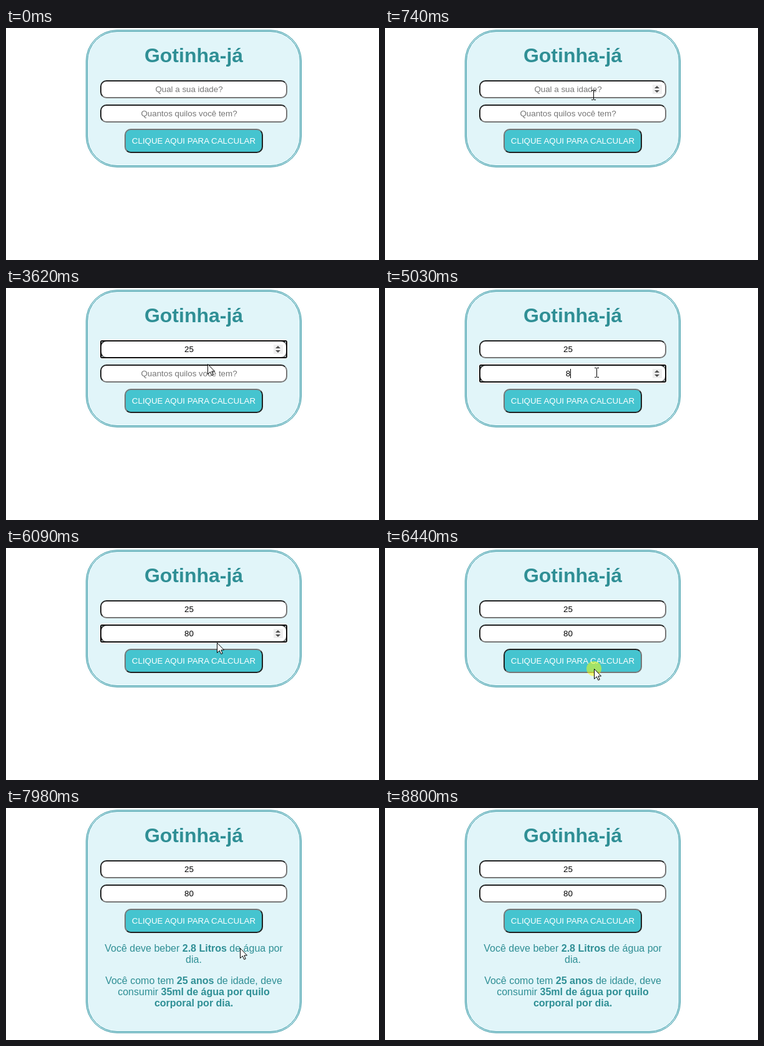
An HTML page with a canvas for the animation above (9.33 s loop, 598 by 373 pixels).

```html
<!DOCTYPE html>
<html lang="pt-BR">
<head>
<meta charset="utf-8">
<title>Calculadora de água</title>
<style>
  html, body { margin: 0; width: 100%; height: 100%; overflow: hidden; background: #fff; }
  body { position: relative; font-family: "Liberation Sans", Arial, sans-serif; }
  div, h1, canvas { position: absolute; box-sizing: border-box; }
  h1, p { margin: 0; text-align: center; }

  #card {
    left: 128px; top: 3px; width: 346px; height: 221px;
    border: 3px double #2e93a0; border-radius: 50px; background: #e1f5f9;
  }
  #card.open { height: 359px; }

  h1 { left: 128px; top: 26px; width: 346px; font-size: 32px; line-height: 36px; color: #2f8f95; }

  .field, #button { border: 2px solid; border-radius: 10px; font-size: 13.3333px; line-height: 15px; text-align: center; white-space: nowrap; }
  .field { left: 151px; width: 300px; height: 29px; background: #fff; border-color: #212121 #767676 #767676 #212121; }
  .label { left: 5px; top: 5px; width: 271px; height: 15px; color: #000; }
  .label.hint { color: #757575; }
  .caret { top: 5px; width: 1px; height: 15px; background: #000; }
  .spinner { left: 276px; top: 5px; width: 15px; height: 15px; background: #efefef; }
  .spinner::before, .spinner::after { content: ""; position: absolute; left: 3px; border: solid transparent; border-width: 0 4.5px; }
  .spinner::before { top: 2px; border-bottom: 4.5px solid #505050; }
  .spinner::after { top: 9px; border-top: 4.5px solid #505050; }
  .ring { left: -2px; top: -2px; width: 300px; height: 29px; border: 2px solid #101010; border-radius: 3px; box-shadow: 0 0 0 1px #fff; }

  #button {
    left: 190px; top: 162px; width: 222px; height: 39px; padding-top: 10px;
    color: #fff; background: #45c4cf; border-color: #767676 #212121 #212121 #767676;
  }
  #button.pressed { border-color: #212121 #767676 #767676 #212121; }

  #result { left: 151px; top: 217px; width: 300px; font-size: 16px; line-height: 18px; color: #2f8f95; white-space: nowrap; }
  #result p + p { margin-top: 16px; }
  canvas { left: 0; top: 0; }
</style>
</head>
<body>
<div id="card"></div>
<h1>Gotinha-já</h1>
<div class="field" style="top:84px"></div>
<div class="field" style="top:123px"></div>
<div id="button">CLIQUE AQUI PARA CALCULAR</div>
<div id="result">
  <p>Você deve beber <b>2.8 Litros</b> de água por<br>dia.</p>
  <p>Você como tem <b>25 anos</b> de idade, deve<br>consumir <b>35ml de água por quilo<br>corporal por dia.</b></p>
</div>
<canvas id="pointer" width="598" height="373"></canvas>

<script>
const LOOP = 9330, STEP = 67, BLINK = 530;
const PRESS = 6440, RELEASE = 6570;

const $ = id => document.getElementById(id);
const ctx = $("pointer").getContext("2d");
const arrow = new Path2D("M.5 .5V16.5L4.3 12.9L6.8 18.5L9.2 17.5L6.8 12H11.5Z");

const smooth = p => p * p * (3 - 2 * p);
const easeOut = p => 1 - (1 - p) ** 2;

// Pointer waypoints: time, x, y
const path = [
  [330, 463, 269], [810, 331, 104], [3353, 331, 104], [3620, 323, 122],
  [3960, 339, 136], [5753, 339, 136], [5820, 339, 139], [5953, 339, 139],
  [6370, 335, 194], [7713, 335, 194], [8660, 540, 354], [8730, 547, 362], [8800, 547, 362]
];
const clicks = [[950, 1020], [4030, 4160], [PRESS, RELEASE]];

const fields = [
  { top: 84, hint: "Qual a sua idade?", focus: 950, blur: 4030, keys: [[2490, "2"], [2620, "25"]] },
  { top: 123, hint: "Quantos quilos você tem?", focus: 4030, blur: PRESS, keys: [[5030, "8"], [5160, "80"]] }
];

document.querySelectorAll(".field").forEach((el, i) => {
  for (const name of ["label", "spinner", "ring", "caret"]) {
    const part = document.createElement("div");
    part.className = name;
    el.append(part);
    fields[i][name] = part;
  }
});

function pointerAt(t) {
  if (t < path[0][0] || t >= path[path.length - 1][0]) return null;
  const i = path.findIndex(([time]) => time > t) - 1;
  const [t0, x0, y0] = path[i], [t1, x1, y1] = path[i + 1];
  const held = Math.floor((t - t0 + 1) / STEP) * STEP;
  const p = (i ? smooth : easeOut)(Math.min(1, held / (t1 - t0)));
  return { x: Math.round(x0 + (x1 - x0) * p), y: Math.round(y0 + (y1 - y0) * p) };
}

const isOver = (field, pt) =>
  !!pt && pt.x >= 151 && pt.x < 451 && pt.y >= field.top && pt.y < field.top + 29;

const show = (el, visible) => { el.style.visibility = visible ? "visible" : "hidden"; };

function drawField(field, t, pt) {
  const focused = t >= field.focus && t < field.blur;
  const typed = field.keys.filter(([time]) => t >= time);
  const [lastEdit, text] = typed.length ? typed[typed.length - 1] : [field.focus, ""];
  field.label.textContent = text || field.hint;
  field.label.classList.toggle("hint", !text);
  field.caret.style.left = 141 + 3 * text.length + "px";
  show(field.caret, focused && Math.floor((t - lastEdit) / BLINK) % 2 === 0);
  show(field.ring, focused);
  show(field.spinner, focused || isOver(field, pt));
}

function drawBeam({ x, y }) {
  ctx.fillStyle = "#000";
  ctx.fillRect(x, y - 7, 1, 14);
  for (const row of [y - 8, y + 7]) {
    ctx.fillRect(x - 3, row, 3, 1);
    ctx.fillRect(x + 1, row, 3, 1);
  }
}

function drawArrow({ x, y }) {
  ctx.save();
  ctx.translate(x, y);
  ctx.fillStyle = "#fff";
  ctx.strokeStyle = "#000";
  ctx.lineWidth = 1;
  ctx.fill(arrow);
  ctx.stroke(arrow);
  ctx.restore();
}

function drawPointer(t, pt) {
  ctx.clearRect(0, 0, 598, 373);
  if (!pt) return;
  if (clicks.some(([down, up]) => t >= down && t < up)) {
    ctx.fillStyle = "rgba(255, 255, 0, .5)";
    ctx.beginPath();
    ctx.arc(pt.x, pt.y, 12, 0, 2 * Math.PI);
    ctx.fill();
  }
  (fields.some(f => isOver(f, pt)) ? drawBeam : drawArrow)(pt);
}

function render(t) {
  const pt = pointerAt(t);
  fields.forEach(f => drawField(f, t, pt));
  $("button").classList.toggle("pressed", t >= PRESS && t < RELEASE);
  $("card").classList.toggle("open", t >= RELEASE);
  show($("result"), t >= RELEASE);
  drawPointer(t, pt);
}

const start = performance.now();
function tick() {
  render((performance.now() - start) % LOOP);
  requestAnimationFrame(tick);
}
tick();
</script>
</body>
</html>
```
